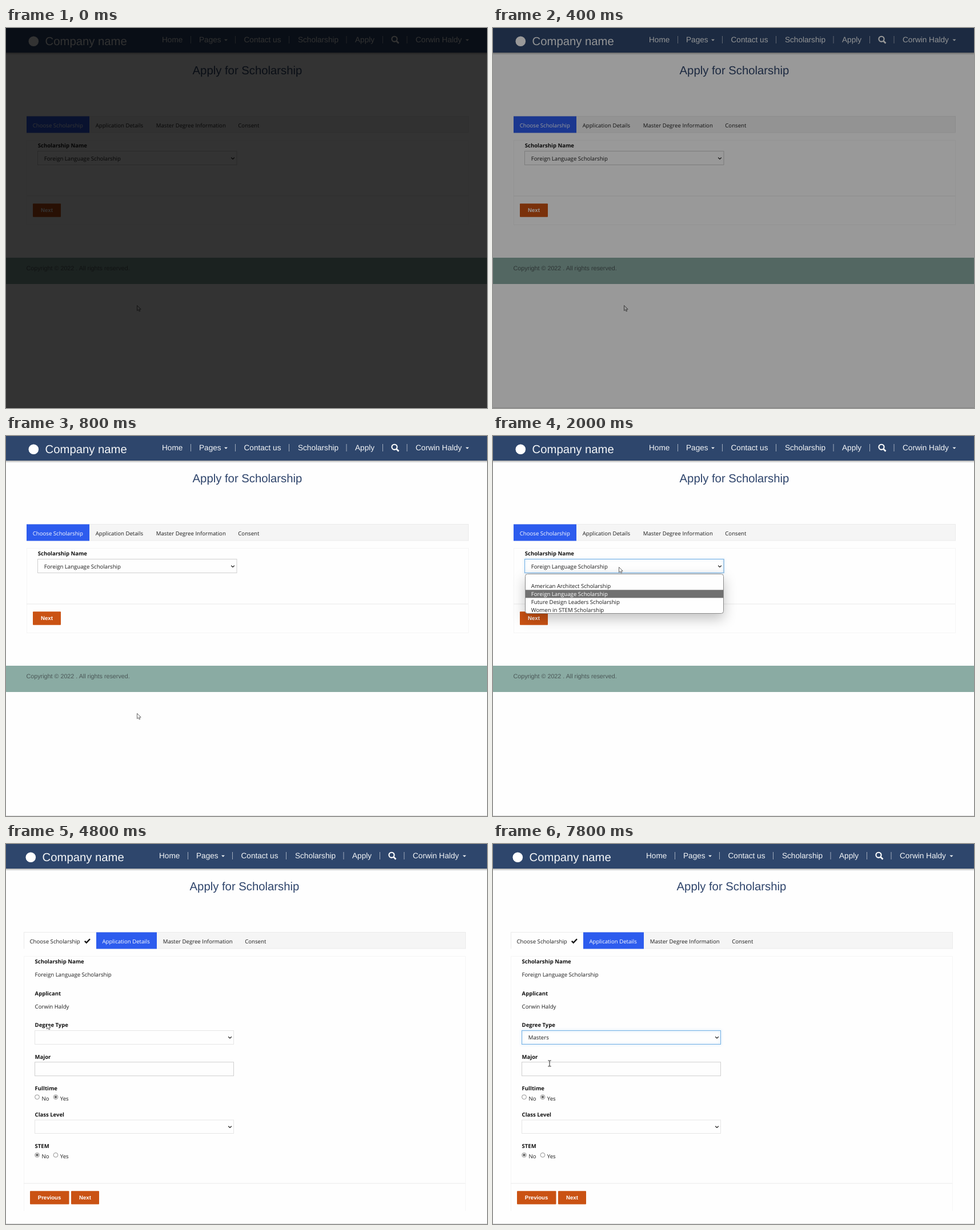
These frames come from a looping animation (842x665 px, 8 s). An HTML page:

```html
<!DOCTYPE html>
<html lang="en">
<head>
<meta charset="utf-8">
<title>Apply for Scholarship</title>
<style>
html, body { margin: 0; width: 100%; height: 100%; overflow: hidden; background: #fefefe; }
svg { display: block; width: 842px; height: 665px; }
text { font: 9.65px "Open Sans", sans-serif; fill: #1c1c1c; text-rendering: geometricPrecision; white-space: pre; }
.label { font-size: 9.52px; font-weight: 700; fill: #111; }
.nav text { font: 13.6px "Liberation Sans", Arial, sans-serif; fill: #f4f6f8; }
.nav .brand, .title { font: 20.3px "Liberation Sans", Arial, sans-serif; }
.title { fill: #2e446b; }
.copy { font: 10.76px "Liberation Sans", Arial, sans-serif; fill: #4b5757; }
.btn { fill: #ca5213; }
.btn-text { font: 700 9.6px "Liberation Sans", Arial, sans-serif; fill: #fff; text-anchor: middle; }
.on { fill: #fff; }
.blue { fill: #2d5cee; }
.bar { fill: #f5f5f5; stroke: #ebebeb; }
.panel { fill: none; stroke: #f5f5f5; }
.rule { stroke: #e9e9e9; }
.field { fill: none; stroke: #cfcfcf; }
.pale { stroke: #e6e6e6; }
.focus { fill: none; stroke: #76b2e6; filter: drop-shadow(0 0 2px rgba(102,175,233,.6)); }
.menu { fill: #fefefe; stroke: #8a8a8a; filter: drop-shadow(0 9px 11px rgba(0,0,0,.24)); }
.mark { fill: #707070; }
.line { fill: none; stroke: #222; stroke-width: 1.3; }

/* one step of the 8 s loop is 200 ms = 2.5 % */
.dim, .shift, .p1, .p2, .menu1, .focus1, .menu2, .focus2, .picked,
.row, .bach, .mast, .move, .arrow, .beam { animation: 8s step-end infinite; }
.dim { animation-name: dim; }
.shift { animation-name: shift; }
.p1 { animation-name: p1; }
.p2 { animation-name: p2; }
.menu1 { animation-name: menu1; }
.focus1 { animation-name: focus1; }
.menu2 { animation-name: menu2; }
.focus2 { animation-name: focus2; }
.picked, .beam { animation-name: picked; }
.arrow { animation-name: arrow; }
.row { animation-name: row; }
.bach { animation-name: bach; }
.mast { animation-name: mast; }
.move { animation-name: move; }

@keyframes dim { 0% { opacity: .8 } 2.5% { opacity: .6 } 5% { opacity: .4 } 7.5% { opacity: .2 } 10%, 100% { opacity: 0 } }
@keyframes shift { 0% { transform: none } 55%, 100% { transform: translateX(-5px) } }
@keyframes p1 { 0% { opacity: 1 } 55%, 100% { opacity: 0 } }
@keyframes p2 { 0% { opacity: 0 } 55%, 100% { opacity: 1 } }
@keyframes menu1 { 0% { opacity: 0 } 25% { opacity: 1 } 40%, 100% { opacity: 0 } }
@keyframes focus1 { 0% { opacity: 0 } 25%, 100% { opacity: 1 } }
@keyframes menu2 { 0% { opacity: 0 } 80% { opacity: 1 } 92.5%, 100% { opacity: 0 } }
@keyframes focus2 { 0% { opacity: 0 } 80%, 100% { opacity: 1 } }
@keyframes picked { 0% { opacity: 0 } 92.5%, 100% { opacity: 1 } }
@keyframes arrow { 0% { opacity: 1 } 92.5%, 100% { opacity: 0 } }
@keyframes row { 0% { transform: none } 87.5% { transform: translateY(14px) } 90%, 100% { transform: translateY(27px) } }
@keyframes bach { 0% { fill: #1c1c1c } 87.5% { fill: #fff } 90%, 100% { fill: #1c1c1c } }
@keyframes mast { 0% { fill: #1c1c1c } 90%, 100% { fill: #fff } }
@keyframes move {
  0% { transform: translate(229px, 485px) }
  12.5% { transform: translate(228px, 470px) }
  15% { transform: translate(225px, 408px) }
  17.5% { transform: translate(221px, 300px) }
  20% { transform: translate(220px, 229px) }
  30% { transform: translate(220px, 238px) }
  32.5% { transform: translate(219px, 254px) }
  35% { transform: translate(217px, 270px) }
  37.5% { transform: translate(216px, 276px) }
  47.5% { transform: translate(172px, 290px) }
  50% { transform: translate(108px, 308px) }
  52.5% { transform: translate(71px, 314px) }
  72.5% { transform: translate(84px, 330px) }
  75% { transform: translate(93px, 339px) }
  82.5% { transform: translate(95px, 348px) }
  87.5% { transform: translate(97px, 370px) }
  90% { transform: translate(98px, 383px) }
  92.5%, 100% { transform: translate(99px, 384px) }
}
</style>
</head>
<body>
<svg viewBox="0 0 842 665">
  <defs>
    <linearGradient id="shade" x2="0" y2="1">
      <stop stop-color="#000" stop-opacity=".32"/>
      <stop offset="1" stop-color="#000" stop-opacity="0"/>
    </linearGradient>
    <path id="chev" class="line" d="M-2.8-1.3 0 1.4 2.8-1.3"/>
    <path id="caret" fill="#f4f6f8" d="M-3-1.2h6L0 1.8z"/>
    <path id="sep" stroke="#fff" stroke-opacity=".55" d="M0 14v13"/>
    <g id="off"><circle r="3.9" fill="#fff" stroke="#858585" stroke-width=".9"/></g>
    <g id="set"><use href="#off"/><circle r="2.3" fill="#686868"/></g>
  </defs>

  <rect width="842" height="665" fill="#fefefe"/>
  <rect y="43" width="842" height="4" fill="url(#shade)"/>
  <path d="M0 664.5h842" stroke="#dedede"/>
  <rect width="842" height="43" fill="#2e466c"/>
  <g class="shift">
    <g class="nav">
      <circle cx="48.3" cy="23.3" r="8.8" fill="#fff"/>
      <text class="brand" x="68.6" y="30.2">Company name</text>
      <text x="273" y="25">Home</text>
      <text x="338" y="25">Pages</text>
      <text x="416.5" y="25">Contact us</text>
      <text x="511" y="25">Scholarship</text>
      <text x="611" y="25">Apply</text>
      <text x="717" y="25">Corwin Haldy</text>
      <use href="#caret" x="385" y="21"/>
      <use href="#caret" x="807.5" y="21"/>
      <use href="#sep" x="323.5"/>
      <use href="#sep" x="401.5"/>
      <use href="#sep" x="495.5"/>
      <use href="#sep" x="596"/>
      <use href="#sep" x="659.5"/>
      <use href="#sep" x="702"/>
      <g fill="none" stroke="#fff" stroke-width="2.1">
        <circle cx="680" cy="19.3" r="4.6"/>
        <path d="m683.5 22.8 4 4" stroke-width="2.7"/>
      </g>
    </g>
    <text class="title" x="326.6" y="80.5">Apply for Scholarship</text>
  </g>

  <!-- step one -->
  <g class="p1">
    <rect class="bar" x="36.5" y="154.5" width="773" height="28.5"/>
    <rect class="panel" x="36.5" y="196.5" width="773" height="148"/>
    <path class="rule" d="M36 294h773"/>
    <rect class="blue" x="36" y="154.5" width="110" height="29"/>
    <text class="on" x="46.7" y="173.6">Choose Scholarship</text>
    <text x="156.7" y="173.6">Application Details</text>
    <text x="262.8" y="173.6">Master Degree Information</text>
    <text x="406.3" y="173.6">Consent</text>
    <text class="label" x="55.8" y="209.3">Scholarship Name</text>
    <rect class="field" x="55.5" y="215.5" width="348.5" height="24"/>
    <rect class="focus focus1" x="55.5" y="215.5" width="348.5" height="24"/>
    <text x="66.8" y="232">Foreign Language Scholarship</text>
    <use href="#chev" x="397" y="228"/>
    <rect class="btn" x="47" y="307.3" width="49" height="23.5" rx="1"/>
    <text class="btn-text" x="71.5" y="322">Next</text>
    <rect y="402" width="842" height="46" fill="#8aaba3"/>
    <text class="copy" x="35.5" y="424">Copyright © 2022 . All rights reserved.</text>
    <g class="menu1">
      <rect class="menu" x="56.5" y="241.5" width="347" height="69" rx="4"/>
      <rect class="mark" x="57" y="269.3" width="346" height="14"/>
      <text x="66.8" y="266">American Architect Scholarship</text>
      <text class="on" x="66.8" y="280">Foreign Language Scholarship</text>
      <text x="66.8" y="294">Future Design Leaders Scholarship</text>
      <text x="66.8" y="308">Women in STEM Scholarship</text>
    </g>
  </g>

  <!-- step two -->
  <g class="p2">
    <rect class="bar" x="31.5" y="154.5" width="773" height="28.5"/>
    <rect x="32" y="155" width="126" height="29" fill="#fefefe"/>
    <rect class="blue" x="158" y="154.5" width="106" height="29"/>
    <text x="41.5" y="173.6">Choose Scholarship</text>
    <path d="m137.8 169.8 3 3 6.2-6.6" fill="none" stroke="#111" stroke-width="2.4"/>
    <text class="on" x="168.4" y="173.6">Application Details</text>
    <text x="274.7" y="173.6">Master Degree Information</text>
    <text x="418.2" y="173.6">Consent</text>
    <path class="panel" d="M31.5 642V196.5h773V642"/>
    <path class="rule" d="M31 594h773"/>

    <text class="label" x="50.6" y="209.3">Scholarship Name</text>
    <text x="50.6" y="232">Foreign Language Scholarship</text>
    <text class="label" x="50.6" y="264.6">Applicant</text>
    <text x="50.6" y="287.5">Corwin Haldy</text>
    <text class="label" x="50.6" y="320">Degree Type</text>
    <rect class="field pale" x="50.5" y="326.5" width="348" height="24"/>
    <rect class="focus focus2" x="50.5" y="326.5" width="348" height="24"/>
    <text class="picked" x="61.8" y="342.3">Masters</text>
    <use href="#chev" x="392" y="338.5"/>
    <text class="label" x="50.6" y="375.5">Major</text>
    <rect class="field" x="50.5" y="381.7" width="348" height="24"/>
    <text class="label" x="50.6" y="430.5">Fulltime</text>
    <use href="#off" x="54.5" y="442.8"/>
    <text x="62.5" y="448.6">No</text>
    <use href="#set" x="87" y="442.8"/>
    <text x="94.8" y="448.6">Yes</text>
    <text class="label" x="50.6" y="476.7">Class Level</text>
    <rect class="field pale" x="50.5" y="483" width="348" height="23.5"/>
    <use href="#chev" x="392" y="495"/>
    <text class="label" x="50.6" y="532">STEM</text>
    <use href="#set" x="54.5" y="544.3"/>
    <text x="62.5" y="550">No</text>
    <use href="#off" x="87" y="544.3"/>
    <text x="94.8" y="550">Yes</text>

    <rect class="btn" x="42" y="607.3" width="68.5" height="23.3" rx="1"/>
    <text class="btn-text" x="76" y="622.3">Previous</text>
    <rect class="btn" x="114" y="607.3" width="49" height="23.3" rx="1"/>
    <text class="btn-text" x="138.5" y="622.3">Next</text>

    <g class="menu2">
      <rect class="menu" x="51" y="352.5" width="347" height="41.5" rx="4"/>
      <rect class="mark row" x="51.3" y="352.8" width="346.4" height="13.6" rx="2"/>
      <text class="bach" x="61.8" y="377.5">Bachelor</text>
      <text class="mast" x="61.8" y="391.5">Masters</text>
    </g>
  </g>

  <!-- pointer -->
  <g class="move">
    <path class="arrow" d="M.5.5v9.3l2.2-2 1.5 3.2 1.5-.7-1.4-3.1h2.9z" fill="#fff" stroke="#555" stroke-width=".9"/>
    <path class="beam" d="M-2.7-5h2L0-4.4.7-5h2M0-4.4v9M-2.7 5h2L0 4.4.7 5h2" fill="none" stroke="#222"/>
  </g>

  <!-- fade from black -->
  <rect class="dim" width="842" height="665"/>
</svg>
</body>
</html>
```
